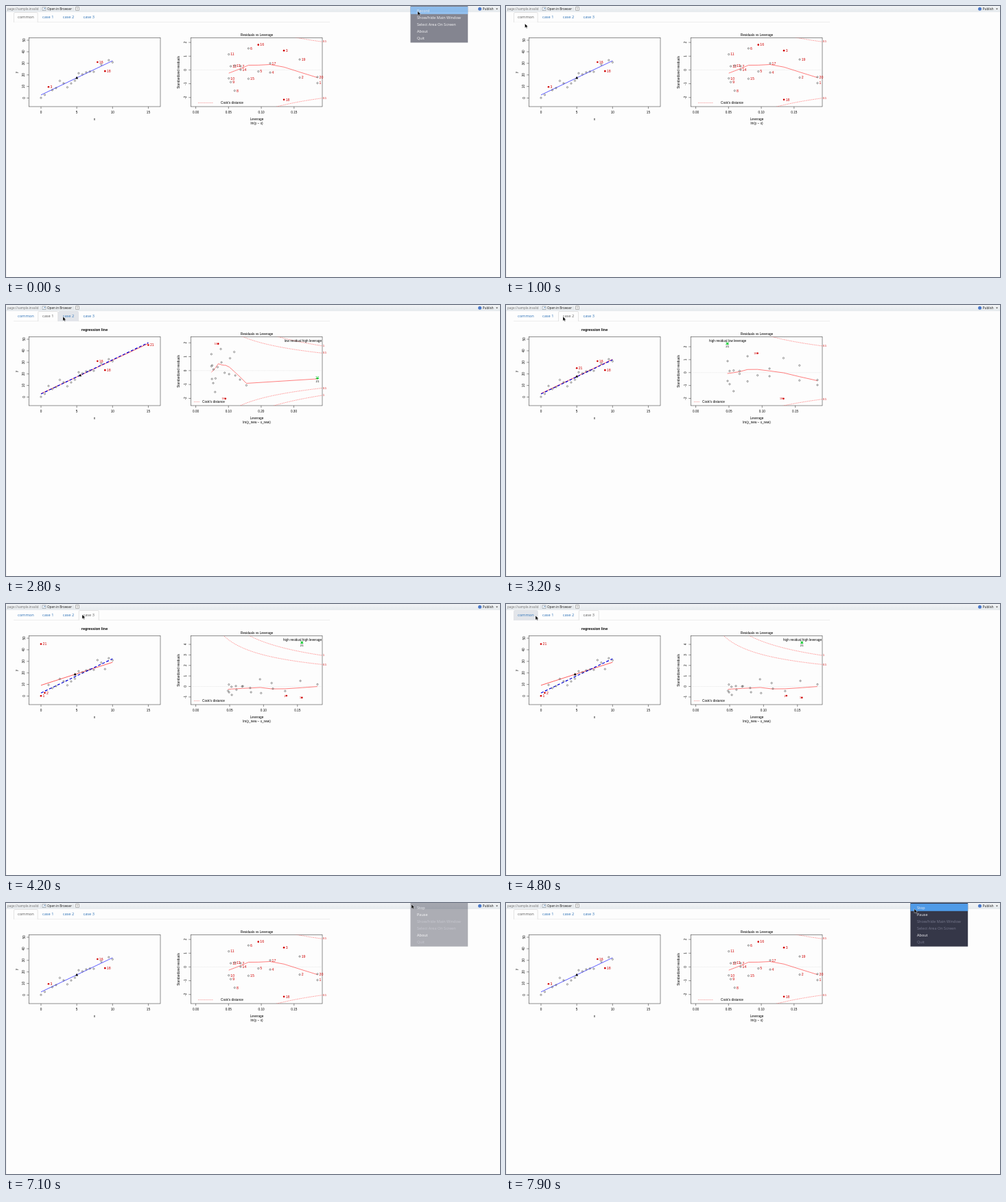
An HTML page for the animation above (8 s loop, 720x396 px).

```html
<!DOCTYPE html>
<html lang="en">
<head>
<meta charset="utf-8">
<title>Leverage demo</title>
<style>
html, body { margin: 0; width: 100%; height: 100%; overflow: hidden; background: #fdfdfd; }
svg { display: block; width: 720px; height: 396px; }
text { white-space: pre; }
.ui { font-family: "Noto Sans", "Open Sans", sans-serif; }
.plot { font-family: "Liberation Sans", Arial, sans-serif; font-size: 4.7px; }
</style>
</head>
<body>
<svg id="stage" viewBox="0 0 720 396"></svg>
<script>
const LOOP = 8000, STEP = 100, GLIDE = 500;
const stage = document.getElementById('stage');

// ---------- helpers ----------
const clamp = (v, lo = 0, hi = 1) => Math.min(hi, Math.max(lo, v));
const ticks = (lo, hi, step) => {
  const first = Math.ceil(lo / step), count = Math.floor(hi / step) - first + 1;
  return Array.from({ length: count }, (_, i) => (first + i) * step);
};
const text = (x, y, s, attrs = '') => `<text x="${x}" y="${y}" ${attrs}>${s}</text>`;
const mid = (x, y, s, attrs = '') => text(x, y, s, 'text-anchor="middle" ' + attrs);
const upright = (x, y, s) => mid(x, y, s, `transform="rotate(-90 ${x} ${y})"`);
const rect = (x, y, w, h, attrs = '') => `<rect x="${x}" y="${y}" width="${w}" height="${h}" ${attrs}/>`;
const path = (d, attrs) => `<path d="${d}" fill="none" ${attrs}/>`;
const poly = (pts, attrs) => path('M' + pts.map(p => p.map(v => v.toFixed(2)).join(' ')).join('L'), attrs);
const ring = (x, y) => `<circle cx="${x}" cy="${y}" r="1.15" fill="none" stroke="#333" stroke-width=".5"/>`;
const dot = (x, y, color) => `<circle cx="${x}" cy="${y}" r="1.3" fill="${color}"/>`;
const RED = '#d00000', AXIS = 'stroke="#444" stroke-width=".6"';

// ---------- statistics ----------
const stdResiduals = [-.95, -.55, 1.42, -.18, -.1, 1.58, .28, -1.5, -.88, -.6,
  1.15, .28, .33, .03, -.63, 1.85, .5, -2.15, .78, -.5];
const data = stdResiduals.map((r, i) => {
  const x = i * 10 / 19, h = .05 + (i - 9.5) ** 2 / 665;
  return [x, 2.66 + 2.954 * x + 2.9 * Math.sqrt(1 - h) * r];
});

function regress(pts) {
  const n = pts.length, sum = f => pts.reduce((total, p) => total + f(p), 0);
  const mx = sum(p => p[0]) / n, my = sum(p => p[1]) / n;
  const sxx = sum(p => (p[0] - mx) ** 2);
  const slope = sum(p => (p[0] - mx) * (p[1] - my)) / sxx;
  const at = x => my + slope * (x - mx);
  const sigma = Math.sqrt(sum(p => (p[1] - at(p[0])) ** 2) / (n - 2));
  const influence = pts.map(([x, y]) => {
    const h = 1 / n + (x - mx) ** 2 / sxx;
    return [h, (y - at(x)) / (sigma * Math.sqrt(1 - h))];
  });
  return { mx, my, at, influence };
}

// Robust locally weighted regression over two thirds of the points.
function lowess(points) {
  const pts = [...points].sort((a, b) => a[0] - b[0]), n = pts.length;
  const ascending = list => [...list].sort((a, b) => a - b);
  const range = pts[n - 1][0] - pts[0][0];
  let trust = pts.map(() => 1), fit;
  for (let pass = 0; pass < 4; pass++) {
    fit = pts.map(([x0]) => {
      const far = pts.map(p => Math.abs(p[0] - x0));
      const reach = ascending(far)[Math.floor(n * 2 / 3) - 1];
      const w = far.map((d, j) => trust[j] * (1 - clamp(d / reach) ** 3) ** 3);
      const sum = f => pts.reduce((total, p, j) => total + w[j] * f(p), 0);
      const total = sum(() => 1), mx = sum(p => p[0]) / total, my = sum(p => p[1]) / total;
      const sxx = sum(p => (p[0] - mx) ** 2), sxy = sum(p => (p[0] - mx) * (p[1] - my));
      return Math.sqrt(sxx / total) > .001 * range ? my + sxy / sxx * (x0 - mx) : my;
    });
    const miss = pts.map((p, j) => Math.abs(p[1] - fit[j])), order = ascending(miss);
    const cut = 3 * (order[n >> 1] + order[(n - 1) >> 1]);
    trust = miss.map(m => (1 - clamp(m / cut) ** 2) ** 2);
  }
  return pts.map((p, j) => [p[0], fit[j]]);
}
const baseFit = regress(data);

// ---------- plots ----------
const TOP = 46.5, BOTTOM = 147, WIDTH = 191.5, HEIGHT = BOTTOM - TOP;
const px = x => 51 + 10.43 * x, py = y => 134.5 - 1.69 * y;

function axes(left, xTicks, yTicks) {
  return rect(left, TOP, WIDTH, HEIGHT, `fill="none" ${AXIS}`) +
    xTicks.map(([x, s]) => path(`M${x} ${BOTTOM}v3.2`, AXIS) + mid(x, 156.7, s)).join('') +
    yTicks.map(([y, s]) => path(`M${left} ${y}h-3.2`, AXIS) + upright(left - 6, y, s)).join('');
}

function scatter(c, pts, fit) {
  const end = Math.max(...pts.map(p => p[0]));
  const line = (f, attrs) => poly([0, end].map(x => [px(x), py(f.at(x))]), attrs);
  const lines = c.extra
    ? line(fit, 'stroke="#f33" stroke-width=".8"') +
      line(baseFit, 'stroke="#0000d8" stroke-width="1.2" stroke-dasharray="4 2.6"')
    : line(fit, 'stroke="#33f" stroke-width=".8"');
  const marks = pts.map(([x, y], i) => c.red.includes(i + 1)
    ? dot(px(x), py(y), RED) + text(px(x) + 2.5, py(y) + 1.8, i + 1, `fill="${RED}" font-size="5.2"`)
    : ring(px(x), py(y))).join('');
  return axes(33.5, ticks(0, 15, 5).map(v => [px(v), v]), ticks(0, 50, 10).map(v => [py(v), v])) +
    mid(129, 167, 'x') + upright(16.5, 97, 'y') +
    (c.extra ? mid(129, 37.6, 'regression line', 'font-weight="bold" font-size="5.4"') : '') +
    lines + marks + `<path d="M${px(fit.mx)} ${py(fit.my) - 2.2}l2 3.6h-4z"/>`;
}

function leverage(c, fit) {
  const left = 269.5, right = left + WIDTH;
  const hMax = Math.max(...fit.influence.map(p => p[0]));
  const rs = fit.influence.map(p => p[1]), rMin = Math.min(...rs), rMax = Math.max(...rs);
  // Limits grow by 8% for labels, then by 4% for the frame.
  const half = (rMax - rMin) / 2 * 1.16 * 1.08, centre = (rMax + rMin) / 2;
  const lx = h => left + WIDTH * (.04 + h / hMax) / 1.08;
  const ly = r => (TOP + BOTTOM) / 2 - (r - centre) / half * HEIGHT / 2;
  const edge = hMax * 1.04;

  let contours = '', tags = '';
  for (const level of [.5, 1]) for (const sign of [1, -1]) {
    const bound = h => ly(sign * Math.sqrt(2 * level * (1 - h) / h));
    const pts = Array.from({ length: 60 }, (_, i) => edge * (i + 6) / 65).map(h => [lx(h), bound(h)]);
    contours += poly(pts, 'stroke="#f55" stroke-width=".6" stroke-dasharray="1.6 1"');
    const y = bound(edge);
    if (y > TOP && y < BOTTOM) tags += text(right + 1, y + 1.2, level, `fill="${RED}" font-size="3.6"`);
  }
  const marks = fit.influence.map(([h, r], i) => {
    const x = lx(h), y = ly(r), n = i + 1, red = c.red.includes(n);
    if (n === 21) return dot(x, y, '#0c2') +
      mid(x, y + 1.2, n, 'fill="#0b2" font-size="4.6"') + mid(x, y + 5.6, n, 'font-size="4.4"');
    const label = !c.extra ? text(x + 2.6, y + 1.8, n, `fill="${RED}" font-size="5.2"`)
      : red ? text(x - 1.4, y + 1.6, n, `text-anchor="end" fill="${RED}" font-size="3.6"`) : '';
    return (red ? dot(x, y, RED) : ring(x, y)) + label;
  }).join('');
  const [keyX, keyWidth, keyText] = c.extra ? [274, 8, 286] : [280, 22, 313];
  return axes(left, ticks(0, edge, hMax > .25 ? .1 : .05).map(v => [lx(v), v.toFixed(2)]),
      ticks(centre - half, centre + half, 1).map(v => [ly(v), v])) +
    mid(365.5, 44.4, 'Residuals vs Leverage') + upright(253, 97, 'Standardized residuals') +
    mid(365.5, 167.2, 'Leverage') + mid(365.5, 172.6, c.extra ? 'lm(y_new ~ x_new)' : 'lm(y ~ x)') +
    path(`M${left} ${ly(0)}H${right}`, 'stroke="#ccc" stroke-width=".5" stroke-dasharray=".8 1"') +
    `<g clip-path="url(#panel)">${contours}</g>` + tags +
    poly(lowess(fit.influence).map(([h, r]) => [lx(h), ly(r)]), 'stroke="#f55" stroke-width=".75"') + marks +
    path(`M${keyX} 141.5h${keyWidth}`, 'stroke="#e44" stroke-width=".5" stroke-dasharray="1 .8"') +
    text(keyText, 143.1, "Cook's distance") +
    (c.note ? text(c.anchor === 'end' ? 460 : 296, 53.8, c.note, `text-anchor="${c.anchor}"`) : '');
}

const cases = [
  { red: [3, 16, 18] },
  { red: [16, 18, 21], extra: [15, 45], note: 'low residual high leverage', anchor: 'end' },
  { red: [16, 18, 21], extra: [5, 25], note: 'high residual low leverage', anchor: 'start' },
  { red: [1, 2, 21], extra: [0, 45], note: 'high residual high leverage', anchor: 'end' }
];
const plots = cases.map(c => {
  const pts = c.extra ? [...data, c.extra] : data, fit = regress(pts);
  return `<g class="plot" visibility="hidden">${scatter(c, pts, fit)}${leverage(c, fit)}</g>`;
}).join('');

// ---------- window chrome ----------
const toolbar = rect(0, 0, 720, 8.3, 'fill="url(#bar)"') + path('M0 8.4H720', 'stroke="#d9dde1" stroke-width=".5"') +
  '<g class="ui" font-size="4.6" fill="#222">' +
  text(2, 5.9, 'page://sample.invalid', 'fill="#777" font-size="4.5"') +
  path('M50.5 1.5v5.5M97.8 1.5v5.5', 'stroke="#ccd0d4" stroke-width=".5"') +
  rect(53, 2, 5, 4.4, 'fill="#fff" stroke="#7d8994" stroke-width=".6"') +
  path('M54.6 5.4l2.2-2.2m-1.4 0h1.4v1.4', 'stroke="#4a7fb5" stroke-width=".6"') +
  text(60, 5.9, 'Open in Browser') +
  rect(101.7, 1.7, 4.6, 4.8, 'fill="#fff" stroke="#888" stroke-width=".6"') +
  path('M102.8 3.2h2.4M102.8 4.8h2.4', 'stroke="#888" stroke-width=".6"') +
  '<circle cx="690.6" cy="4.3" r="2.5" fill="#4a78c8"/>' + text(694.8, 5.9, 'Publish') +
  '<path d="M714 3.5h3l-1.5 2z" fill="#555"/></g>';

const tabs = ['common', 'case 1', 'case 2', 'case 3'].map((name, i) =>
  i ? { name, x: 17 + 29.75 * i, w: 29 } : { name, x: 11.5, w: 34.7 });
const tabBar = path('M11 23.5H472', 'stroke="#e2e2e2" stroke-width=".6"') + tabs.map(({ name, x, w }) =>
  `<g class="ui tab" font-size="5.7"><path d="M${x} 23.8V11q0-1.5 1.5-1.5h${w - 3}q1.5 0 1.5 1.5V23.8" stroke-width=".6"/>` +
  mid(x + w / 2, 18.4, name) + '</g>').join('');

// Items with a leading dash are disabled.
function menu(id, items) {
  return `<g id="${id}" class="ui" font-size="5.5">` +
    rect(589.5, 0, 83.7, items.length * 10.1 + 3, 'fill="#353748"') +
    rect(589.5, 1, 83.7, 10.8, 'class="lit" fill="#4f9be8"') +
    items.map((s, i) => text(599, 8.7 + i * 10.1, s.replace('-', ''),
      `fill="${s[0] === '-' ? '#74768a' : '#e8e8ec'}"`)).join('') + '</g>';
}

stage.innerHTML = `<defs><clipPath id="panel">${rect(269.5, TOP, WIDTH, HEIGHT)}</clipPath>
  <linearGradient id="bar" x2="0" y2="1"><stop stop-color="#f2f4f6"/><stop offset="1" stop-color="#e6eaee"/></linearGradient></defs>` +
  rect(0, 0, 720, 396, 'fill="#fdfdfd"') + path('M.3 8V396', 'stroke="#e2e5e8" stroke-width=".6"') +
  toolbar + tabBar + plots +
  menu('startMenu', ['Record', 'Show/hide Main Window', 'Select Area On Screen', 'About', 'Quit']) +
  menu('stopMenu', ['Stop', 'Pause', '-Show/hide Main Window', '-Select Area On Screen', 'About', '-Quit']) +
  '<path id="cursor" d="M0 0V6.2L1.5 4.9L2.5 7L3.5 6.5L2.6 4.5H4.5Z" stroke="#fff" stroke-width=".4"/>';

// ---------- timeline ----------
// The pointer reaches each stop [time, x, y] after a short glide.
const stops = [[0, 600, 7.5], [600, 281, 85], [1000, 27.5, 25.7], [2000, 55, 19], [2800, 83, 17],
  [3800, 111, 15.5], [4800, 43, 17], [5300, 30, 20], [5900, 528, 3], [6200, 540, 0], [6900, 591, 2], [7900, 595, 8.5]];
const clicks = [2200, 3000, 4100, 5200];

function cursorAt(t) {
  const i = stops.findIndex(s => s[0] >= t);
  if (i < 1) return stops[0].slice(1);
  const [t0, x0, y0] = stops[i - 1], [t1, x1, y1] = stops[i];
  const start = Math.max(t0, t1 - GLIDE), f = clamp((t - start) / (t1 - start));
  const ease = f * f * (3 - 2 * f);
  return [x0 + (x1 - x0) * ease, y0 + (y1 - y0) * ease];
}

const byId = id => document.getElementById(id);
const plotNodes = stage.querySelectorAll('.plot'), tabNodes = stage.querySelectorAll('.tab');
const cursor = byId('cursor'), startMenu = byId('startMenu'), stopMenu = byId('stopMenu');
const stopLit = stopMenu.querySelector('.lit');

function render(t) {
  const [x, y] = cursorAt(t), active = clicks.filter(c => t >= c).length % tabs.length;
  cursor.setAttribute('transform', `translate(${x} ${y})`);
  plotNodes.forEach((node, i) => node.setAttribute('visibility', i === active ? 'visible' : 'hidden'));
  tabNodes.forEach((node, i) => {
    const { x: left, w } = tabs[i], on = i === active;
    const hover = !on && x >= left && x < left + w && y > 9 && y < 23;
    const [shape, label] = node.children;
    shape.setAttribute('fill', on ? '#fdfdfd' : hover ? '#e2e5ea' : 'none');
    shape.setAttribute('stroke', on ? '#d4d4d4' : hover ? '#d8dbe0' : 'none');
    label.setAttribute('fill', on ? '#666' : '#3a7abb');
  });
  startMenu.setAttribute('opacity', clamp(.6 - t / 300));
  stopMenu.setAttribute('opacity', clamp((t - 7000) / 250));
  stopLit.setAttribute('opacity', t >= 7500 ? 1 : 0);
}

const began = performance.now();
function tick() {
  const t = (performance.now() - began) % LOOP;
  render(Math.floor(t / STEP) * STEP);
  requestAnimationFrame(tick);
}
tick();
</script>
</body>
</html>
```
